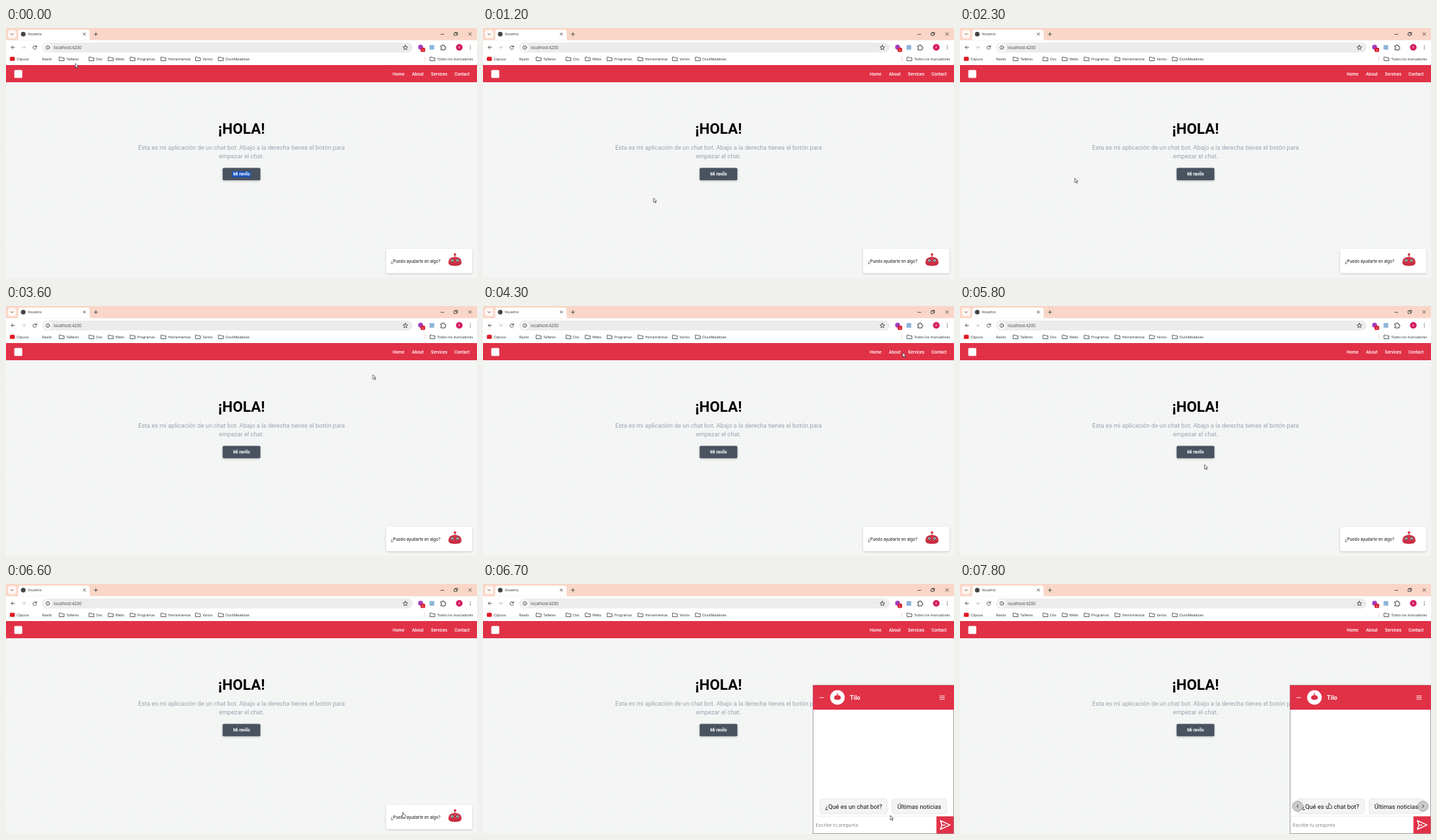
Write an HTML page that moves like this. It is 710 by 378 pixels and loops after 8 s.

```html
<!DOCTYPE html>
<html lang="es">
<head>
<meta charset="utf-8">
<title>Vozamix</title>
<style>
html, body { margin: 0; width: 100%; height: 100%; overflow: hidden; background: #fff; }
svg { display: block; }
text { font-family: Roboto, sans-serif; white-space: pre; }
.ui text { font: 5.3px "Open Sans", "Noto Sans", sans-serif; fill: #2b2b2b; }
.ui .url { font-size: 6.2px; fill: #444; }
.line { fill: none; stroke: #333; stroke-width: .8; stroke-linecap: round; stroke-linejoin: round; }
.bold { font-weight: 700; fill: #fff; }
.nav text { font-size: 6.5px; font-weight: 500; fill: #fff; }
.big { font-size: 9.24px; }
</style>
</head>
<body>
<svg width="710" height="378" viewBox="0 0 710 378">
  <defs>
    <pattern id="dots" width="5.8" height="5.8" patternUnits="userSpaceOnUse">
      <rect width="5.8" height="5.8" fill="#f3f4f4"/>
      <circle cx="1.6" cy="1.6" r=".9" fill="#fcfcfc"/>
      <circle cx="4.5" cy="4.5" r=".6" fill="#f9f9f9"/>
    </pattern>
    <filter id="shadow" x="-10%" y="-20%" width="120%" height="150%">
      <feDropShadow dx="0" dy="1.2" stdDeviation="1.4" flood-opacity=".2"/>
    </filter>
    <path id="folder" class="line" d="M.5 1h2.4l1 1h3.6v4.5h-7z"/>
    <path id="dome" d="M-9.5 13.5C-11 7 -6 3.5 0 3.5S11 7 9.5 13.5Q8.5 17 0 17T-9.5 13.5Z"/>
  </defs>

  <!-- Browser window -->
  <g class="ui">
    <rect width="710" height="56" fill="#fff"/>
    <rect width="710" height="18.5" fill="#f9d6c7"/>
    <rect x="3" y="3" width="12.5" height="12.5" rx="3.5" fill="#fff5f0"/>
    <path d="M16 18.5q2.500 0 2.500-3V6q0-3.500 3.500-3.500h100.500q3.500 0 3.500 3.500v9.500q0 3 2.500 3z" fill="#fff"/>
    <circle cx="26" cy="9.300" r="3.500" fill="#444"/>
    <text x="33" y="11.300">Vozamix</text>
    <path class="line" d="M7.500 8.500l1.800 1.800 1.800-1.800M116.500 7.500l3.400 3.400m0-3.400l-3.400 3.400M133 9.300h5M135.500 6.800v5M655.500 9.500h4.500M697.500 7l4.200 4.200m0-4.200l-4.200 4.200M677 7.500v-1h3.700v3.700h-1M675.700 7.700h3.600v3.600h-3.600z"/>
    <path class="line" d="M13 29.300H8m2.300-2.400L8 29.300l2.300 2.400M45.900 28.500a2.700 2.700 0 1 0 .2 1.700M46.100 26.500v2h-2"/>
    <path class="line" d="M24 29.300h5m-2.300-2.400l2.300 2.400-2.300 2.400" style="stroke:#bbb"/>
    <rect x="54.500" y="22" width="558.500" height="15" rx="7.500" fill="#ececec"/>
    <circle cx="63" cy="29.500" r="6" fill="#fff"/>
    <circle cx="63" cy="29.500" r="2.900" class="line"/>
    <path class="line" d="M63 29.300v1.500M63 28v.1"/>
    <text class="url" x="72" y="31.700">localhost:4200</text>
    <path class="line" d="M602 26l1 2.300 2.500.2-1.900 1.700.6 2.500-2.200-1.300-2.200 1.300.6-2.500-1.900-1.700 2.500-.2z"/>
    <circle cx="625" cy="29" r="3.700" fill="#a23cc0"/>
    <rect x="625" y="29.700" width="6.800" height="6.500" rx="1.500" fill="#d9202e"/>
    <text x="628.400" y="34.700" text-anchor="middle" style="font-size:4px;fill:#fff">6</text>
    <rect x="638.500" y="25.800" width="7" height="7" fill="#8bb4d8"/>
    <path class="line" style="stroke-width:1" d="M655.700 27h1.900q.3-1.700 1.300-1.700t1.200 1.700h1.700v2q1.400.3 1.400 1.200t-1.400 1.200v1.700h-6.100v-2q1.300-.2 1.300-1.100t-1.300-1.100z"/>
    <circle cx="683.300" cy="29.300" r="5" fill="#d41c60"/>
    <text x="683.300" y="31" text-anchor="middle" style="font-size:4.5px;fill:#fff">A</text>
    <path class="line" style="stroke-width:1.300" d="M700 26.900v.01M700 29.300v.01M700 31.700v.01"/>
    <rect x="5.800" y="43.500" width="7.500" height="6.300" rx="1.600" fill="#e01b24"/>
    <text x="16" y="48.700">Clipuva</text>
    <text x="54.500" y="48.700">Ravilo</text>
    <path d="M631.500 43v7" stroke="#f3c9b8" stroke-width=".8"/>
    <g id="marks"></g>
  </g>

  <!-- Page -->
  <rect y="56" width="710" height="322" fill="url(#dots)"/>
  <rect y="56" width="710" height="26" fill="#e13147"/>
  <rect x="12.500" y="63.500" width="12" height="12" rx="1.500" fill="#fff"/>
  <g class="nav" id="nav"></g>
  <text class="bold" x="355" y="160.400" text-anchor="middle" style="font-size:22.200px;fill:#000">¡HOLA!</text>
  <g class="big" text-anchor="middle" fill="#9ca3af">
    <text x="355" y="184.300">Esta es mi aplicación de un chat bot. Abajo a la derecha tienes el botón para</text>
    <text x="355" y="197.200">empezar el chat.</text>
  </g>
  <rect x="326.500" y="211.500" width="57" height="18.700" rx="2" fill="#4a5361" filter="url(#shadow)"/>
  <rect id="selection" x="341" y="216.800" width="28" height="8.600" fill="#1552c4"/>
  <text class="bold" x="355" y="223.400" text-anchor="middle" style="font-size:6.500px">Mi ravilo</text>

  <g id="invite">
    <rect x="573" y="334" width="130" height="36.500" rx="2.500" fill="#fff" filter="url(#shadow)"/>
    <text x="580.500" y="354.700" font-size="6.500" fill="#222">¿Puedo ayudarte en algo?</text>
    <g transform="translate(676.800 342.500)">
      <path d="M0 0v4" stroke="#333" stroke-width=".8"/>
      <circle r="1.900" fill="#e13147"/>
      <use href="#dome" fill="#dd3448"/>
      <path d="M-9.700 11.500Q0 15 9.700 11.500Q10.500 17 0 17T-9.700 11.500Z" fill="#c62c40"/>
      <g fill="#fff" stroke="#333" stroke-width=".9"><circle cx="-4" cy="9" r="2.300"/><circle cx="4" cy="9" r="2.300"/></g>
      <circle cx="-4" cy="9" r=".9" fill="#222"/><circle cx="4" cy="9" r=".9" fill="#222"/>
    </g>
  </g>

  <!-- Chat panel -->
  <g id="chat">
    <rect x="497.500" y="153" width="212" height="224.500" fill="#fff" stroke="#888" stroke-width=".8"/>
    <rect x="497.500" y="153" width="212.500" height="37" fill="#e13147"/>
    <path d="M507 171.800h7M688 169.200h8M688 171.700h8M688 174.200h8" stroke="#fff" stroke-width=".9"/>
    <circle cx="534.300" cy="171.500" r="11" fill="#fff"/>
    <g transform="translate(534.300 166.300) scale(.52)" fill="#dd3448">
      <path d="M-.7 0h1.400v5h-1.400z"/><circle r="2.200"/><use href="#dome"/>
      <path d="M-6 9h12" stroke="#8d1d2c" stroke-width="2" stroke-dasharray="3 6"/>
    </g>
    <text class="bold big" x="553" y="174.600">Tilo</text>
    <g fill="#f4f4f5" stroke="#dfe1e4" stroke-width=".8">
      <rect x="508.300" y="325" width="101" height="22.300" rx="3.500"/>
      <rect x="616.800" y="325" width="82" height="22.300" rx="3.500"/>
    </g>
    <g class="big" text-anchor="middle" fill="#111">
      <text x="558.800" y="339.500">¿Qué es un chat bot?</text>
      <text x="657.800" y="339.500">Últimas noticias</text>
    </g>
    <path d="M498 351h186" stroke="#dcebe8" stroke-width=".8"/>
    <text x="501.500" y="367" font-size="7.400" fill="#8d9199">Escribe tu pregunta</text>
    <rect x="683.500" y="351.300" width="26" height="26" fill="#e13147"/>
    <path d="M689.500 357.800l14.500 6.600-14.500 6.600 2.300-6.600zM692 364.400h5" fill="none" stroke="#fff" stroke-width="1.500" stroke-linejoin="round"/>
    <g id="arrows" fill="#cacaca" stroke="#8f8f8f" stroke-width=".7">
      <circle cx="509" cy="336" r="7.800"/><circle cx="698" cy="336" r="7.800"/>
      <path d="M510.200 333.600l-2.400 2.400 2.400 2.400M696.800 333.600l2.400 2.400-2.400 2.400" fill="none" stroke="#222" stroke-width=".9"/>
    </g>
  </g>

  <g id="cursor" fill="#fff" stroke="#222" stroke-width=".65" stroke-linejoin="round">
    <path id="pointer" d="M0 0v6.600l1.500-1.400 1.200 2.500 1.100-.5-1.200-2.500h2.200z"/>
    <path id="hand" d="M-.6.5Q0-.4.6.5v2.600l2.600.7q.8.300.7 1.200l-.5 3.200h-3.600l-2-2.500q-.3-.9.500-.7l1.100.7z"/>
  </g>
</svg>
<script>
const $ = id => document.getElementById(id);
const show = (id, on) => $(id).style.display = on ? '' : 'none';

const marks = [[80, 'Talleres'], [125, 'Doc'], [154, 'Webs'], [187, 'Programas'],
  [233.5, 'Herramientas'], [285.5, 'Varios'], [320, 'DuskMeadows'], [639, 'Todos los marcadores']];
$('marks').innerHTML = marks.map(([x, name]) =>
  `<use href="#folder" x="${x}" y="43"/><text x="${x + 11}" y="48.7">${name}</text>`).join('');

const links = [[583, 18, 'Home'], [612, 17.5, 'About'], [640.5, 24.5, 'Services'], [676, 23.5, 'Contact']];
$('nav').innerHTML = links.map(([x, w, name], i) =>
  `<text x="${x}" y="71.7">${name}</text><path id="link${i}" d="M${x} 74h${w}" stroke="#fff" stroke-width=".7"/>`).join('');

// Pointer moves: first step, last step, end point
const LOOP = 8000, STEP = 100, OPEN = 6700;
const moves = [
  [300, 500, 363, 217], [1100, 1100, 310, 268], [1200, 1200, 257, 257], [2300, 2300, 173, 227],
  [3000, 3100, 287, 159], [3600, 3600, 553, 104], [3900, 4000, 592, 70], [4100, 4700, 687, 71],
  [4900, 4900, 686, 72], [5000, 5000, 609, 102], [5200, 5200, 402, 170], [5500, 5600, 330, 222],
  [5800, 6400, 600, 347], [6600, 6600, 598.5, 345], [6700, 6700, 614, 350],
  [7000, 7300, 590, 307], [7400, 7800, 556.5, 331]
];

function pointerAt(t) {
  let x = 104.5, y = 53.5;
  for (const [from, to, endX, endY] of moves) {
    if (t < from) break;
    const k = Math.min(1, (Math.floor((t - from) / STEP) + 1) / ((to - from) / STEP + 1));
    x += (endX - x) * k;
    y += (endY - y) * k;
  }
  return [x, y];
}

function draw(t) {
  const [x, y] = pointerAt(t), open = t >= OPEN;
  const over = (left, top, w, h) => x >= left && x <= left + w && y >= top && y <= top + h;
  const onLink = links.map(([left, w]) => over(left, 65, w, 9));
  const onChip = over(508, 325, 101, 22) || over(617, 325, 82, 22);
  const hand = onLink.includes(true) || over(326, 211, 58, 19) ||
    (open ? onChip : over(573, 334, 130, 37));
  onLink.forEach((on, i) => show('link' + i, on));
  show('selection', t < STEP);
  show('invite', !open);
  show('chat', open);
  show('arrows', over(498, 320, 212, 29));
  show('hand', hand);
  show('pointer', !hand);
  $('cursor').setAttribute('transform', `translate(${x} ${y})`);
}

const start = performance.now();
function tick() {
  draw((performance.now() - start) % LOOP);
  requestAnimationFrame(tick);
}
tick();
</script>
</body>
</html>
```
